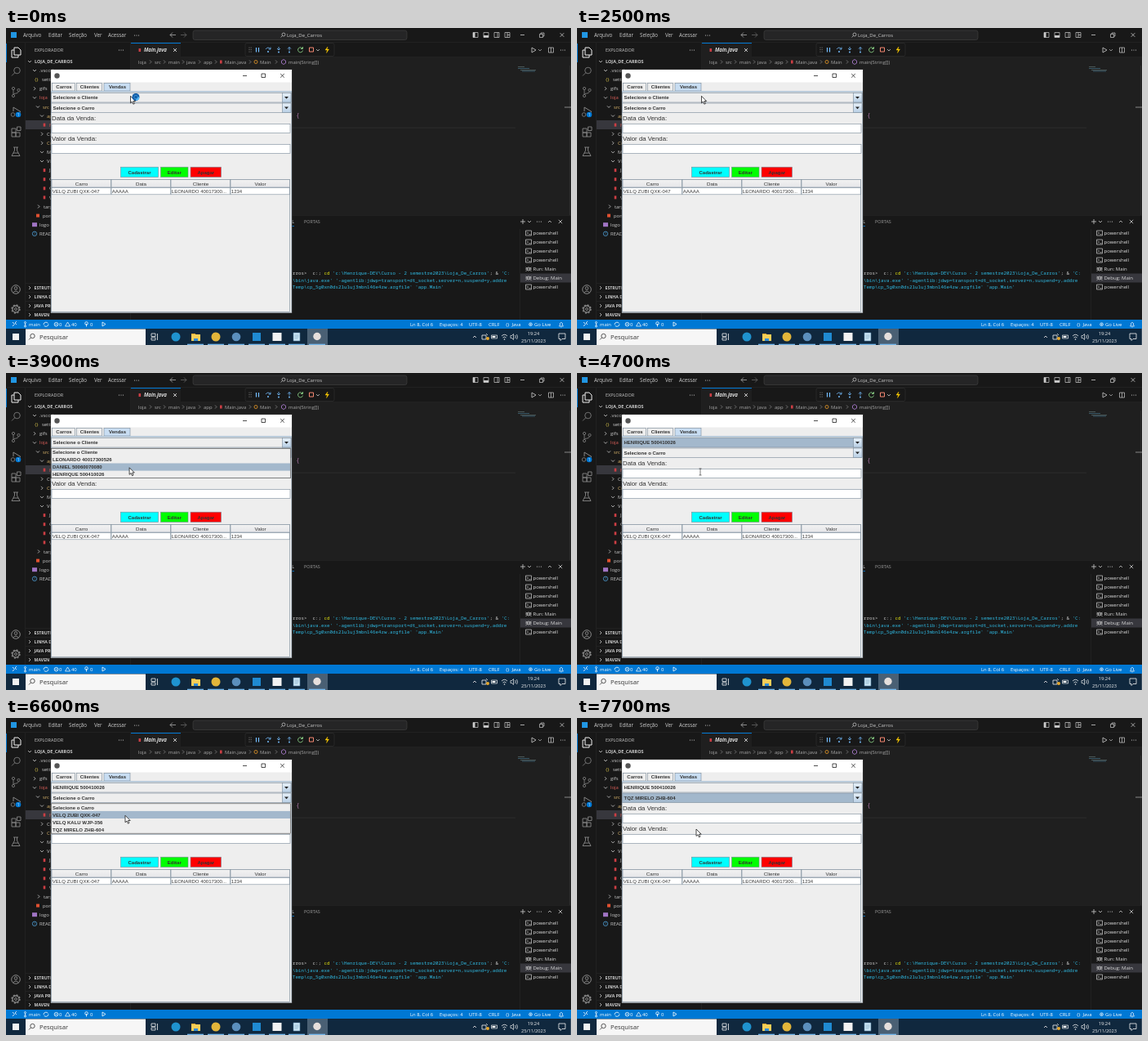
An HTML page that plays this animation: 692 by 388 pixels, repeating every 8000 ms.

```html
<!DOCTYPE html>
<html lang="pt-BR">
<head>
<meta charset="utf-8">
<title>Loja_De_Carros</title>
<style>
html, body { margin: 0; width: 100%; height: 100%; overflow: hidden; background: #181818; }
svg { display: block; width: 692px; height: 388px; font-family: "Open Sans", "Noto Sans", sans-serif; }
text { white-space: pre; }
.swing { font-family: "Liberation Sans", Arial, sans-serif; }
.mono { font-family: "Noto Sans Mono", "Liberation Mono", monospace; }
</style>
</head>
<body>
<svg id="stage" viewBox="0 0 692 388"></svg>
<script>
const rect = (x, y, w, h, fill, more = '') =>
  `<rect x="${x}" y="${y}" width="${w}" height="${h}" fill="${fill}" ${more}/>`;
const box = (x, y, w, h, fill, stroke = '#7a8a99') =>
  rect(x + .5, y + .5, w - 1, h - 1, fill, `stroke="${stroke}" stroke-width=".6"`);
const dot = (x, y, r, fill, more = '') =>
  `<circle cx="${x}" cy="${y}" r="${r}" fill="${fill}" ${more}/>`;
const ring = (x, y, r, color, w = .8) => dot(x, y, r, 'none', `stroke="${color}" stroke-width="${w}"`);
const path = (d, color = '#ccc', w = .8, fill = 'none') =>
  `<path d="${d}" stroke="${color}" stroke-width="${w}" fill="${fill}"/>`;
// y is the middle of the line
const text = (x, y, s, size = 5.9, fill = '#ccc', more = '') =>
  `<text x="${x}" y="${y + size * .36}" font-size="${size}" fill="${fill}" ${more}>${s.replace(/&/g, '&amp;').replace(/</g, '&lt;')}</text>`;
const bold = (x, y, s, fill = '#333', more = '') => text(x, y, s, 6, fill, 'font-weight="700" ' + more);
const centered = 'text-anchor="middle"';
const cross = (x, y, r, color = '#ccc', w = .8) =>
  path(`M${x - r} ${y - r}l${2 * r} ${2 * r}M${x + r} ${y - r}l${-2 * r} ${2 * r}`, color, w);
const dots = (x, y) => [-2.5, 0, 2.5].map(d => dot(x + d, y, .6, '#ccc')).join('');
const down = (x, y, c = '#ccc') => path(`M${x - 2} ${y - 1}l2 2l2-2`, c, .8);
const up = (x, y, c = '#ccc') => path(`M${x - 2} ${y + 1}l2-2l2 2`, c, .8);
const right = (x, y, c = '#ccc') => path(`M${x - 1} ${y - 2}l2 2l-2 2`, c, .8);
const lens = (x, y, r, c) => ring(x, y, r, c) + path(`M${x - r * .7} ${y + r * .7}l${-r} ${r}`, c, .8);

function titleBar() {
  let s = rect(0, 0, 692, 18, '#181818') + rect(0, 17.5, 692, .5, '#2b2b2b') + rect(6, 5, 7, 7, '#2196e3');
  [[21, 'Arquivo'], [52, 'Editar'], [77, 'Seleção'], [108, 'Ver'], [125, 'Acessar']]
    .forEach(([x, label]) => s += text(x, 8.5, label, 6.2));
  s += dots(160, 9) + path('M208 8.5h-7m3-3l-3 3l3 3', '#aaa') + path('M214 8.5h7m-3-3l3 3l-3 3', '#666');
  s += rect(229, 3, 262, 11.5, '#252526', 'rx="2.5" stroke="#454545" stroke-width=".6"');
  s += lens(340, 8, 2, '#bbb') + text(344, 8.7, 'Loja_De_Carros', 6);
  [575, 588, 601, 614].forEach((x, i) => {
    s += path(`M${x - 3} 5.5h6v6h-6z`, '#ccc', .7);
    s += [rect(x - 3, 5.5, 2.5, 6, '#ccc'), rect(x - 3, 9, 6, 2.5, '#ccc'),
      path(`M${x + 1} 5.5v6`, '#ccc', .7), path(`M${x} 5.5v6M${x} 8.5h3`, '#ccc', .7)][i];
  });
  return s + path('M630 8.5h5') + path('M653.500 7.500h4v4h-4zM655 7.500v-1.500h4v4h-1.500', '#ccc', .7) + cross(681, 8.5, 2.3);
}

function activityBar() {
  const c = '#868686';
  let s = rect(0, 18, 24, 340, '#181818') + rect(23.5, 18, .5, 340, '#2b2b2b') + rect(0, 19, 1, 23, '#0078d4');
  s += path('M10 24h5l3 3v6h-8zM10 27h-3v9h8v-3', '#eee', 1);
  s += lens(13.500, 52, 3.800, c);
  s += ring(9, 74, 1.6, c) + ring(15.5, 76, 1.6, c) + ring(9, 83, 1.6, c) + path('M9 75.600v5.800M15.500 77.600q0 2.500-6 3', c);
  s += path('M9 97l9 5.500l-5 3M9 97v5', c, 1) + ring(8.5, 106, 2.3, c) + dot(15, 106, 3.3, '#0078d4') +
    text(15, 106, '1', 4.5, '#fff', centered);
  s += path('M7 123h5v5h-5zM7 128h5v5h-5zM12 128h5v5h-5zM13.500 121h4.500v4.500h-4.500z', c, .9);
  s += path('M9 146h6M10.500 146v4l-3.500 6.500h10l-3.500-6.500v-4M9 153h6', c, .9);
  s += ring(12, 320, 5.3, c, 1) + ring(12, 318.5, 1.8, c, 1) + path('M8.500 324q3.500-4 7 0', c, 1);
  return s + ring(12, 344, 4, c, 1.3) + ring(12, 344, 1.5, c, 1) +
    dot(12, 344, 5, 'none', `stroke="${c}" stroke-width="1.400" stroke-dasharray="2 1.927"`);
}

function explorer() {
  const red = '#e0605a', gold = '#d9b36a', grey = '#ccc';
  let s = rect(24, 18, 129, 340, '#181818') + rect(152.5, 18, .5, 340, '#2b2b2b');
  s += text(35, 27, 'EXPLORADOR', 5.5) + dots(141, 27) + down(29, 41) +
    text(35, 41, 'LOJA_DE_CARROS', 5.5, grey, 'font-weight="700"') + rect(24, 113, 129, 11, '#37373d');
  // kind: v open folder, > closed folder, j class file, others are small glyphs
  const rows = [['v', 35, '.vscode'], ['{', 38, 'settings'], ['>', 35, 'gifs'], ['v', 35, 'loja', red],
    ['v', 39, 'src', gold], ['v', 44, 'app', gold], ['j', 47, 'Main', red], ['>', 44, 'Connection'],
    ['>', 44, 'Controller', gold], ['v', 44, 'Model'], ['v', 44, 'View'], ['j', 47, 'Ja'], ['j', 47, 'Ca'],
    ['j', 47, 'Cl'], ['j', 47, 'Ve'], ['>', 40, 'target'], ['p', 39, 'pom'], ['i', 35, 'logo'], ['r', 35, 'README']];
  rows.forEach(([kind, x, label, color = grey], i) => {
    const y = 52 + i * 11.1;
    s += kind == 'v' ? down(x, y) : kind == '>' ? right(x, y) : kind == '{' ? text(x - 3, y, '{}', 6, '#d6c04a') :
      kind == 'j' ? rect(x - 1.3, y - 2, 2.6, 4, '#cc3e44') : kind == 'p' ? rect(x - 2, y - 2, 4, 4, '#e05030') :
      kind == 'i' ? rect(x - 3, y - 2.5, 6, 5, '#a074c4') : ring(x, y, 2.7, '#4d9fd6') + text(x, y, 'i', 4.5, '#4d9fd6', centered);
    s += text(x + 6, y, label, 5.9, color);
  });
  ['ESTRUTURA', 'LINHA DO TEMPO', 'JAVA PROJECTS', 'MAVEN'].forEach((label, i) => {
    const y = 318 + i * 11;
    s += rect(24, y - 5.5, 129, .5, '#2b2b2b') + right(29, y) + text(34.5, y, label, 5.2, grey, 'font-weight="700"');
  });
  return s;
}

function editor() {
  let s = rect(153, 18, 539, 212, '#1f1f1f') + rect(153, 18, 539, 18, '#181818') +
    rect(153, 18, 61, 18, '#1f1f1f') + rect(153, 18, 61, 1, '#0078d4') + rect(214, 35.5, 478, .5, '#2b2b2b');
  s += rect(162.5, 25, 2.6, 4, '#cc3e44') + text(169, 27, 'Main.java', 6.2, '#fff', 'font-style="italic" font-weight="600"') + cross(207, 27, 2, '#eee');
  [[162, 'loja'], [182, 'src'], [199, 'main'], [221, 'java'], [242, 'app'], [268, 'Main.java'], [311, 'Main'], [346, 'main(String[])']]
    .forEach(([x, label]) => s += text(x, 41.5, label, 5.9, '#a9a9a9'));
  [177, 194, 217, 237, 257, 299, 331].forEach(x => s += right(x, 41.5, '#888'));
  s += rect(262, 39.5, 2.6, 4, '#cc3e44') + ring(306, 41.5, 2, '#ee9d28') + path('M340 38.500l2.500 1.500v3l-2.500 1.500l-2.500-1.500v-3z', '#b180d7');
  // debug toolbar
  s += rect(293, 18.5, 109, 16, '#181818', 'rx="2" stroke="#333" stroke-width=".6"');
  for (let i = 0; i < 6; i++) s += dot(298 + i % 2 * 2.2, 24 + (i >> 1) * 2.5, .6, '#888');
  const blue = '#75beff';
  s += path('M306.500 24v5.500M309.500 24v5.500', blue, 1.2);
  s += path('M318 26q3-4 6 0m0-2.500v2.500h-2.500', blue, .8) + dot(321, 29, 1, blue);
  s += path('M334 23v4m-2-2l2 2l2-2', blue, .8) + dot(334, 29.5, 1, blue);
  s += path('M347 27.500v-4m-2 2l2-2l2 2', blue, .8) + dot(347, 29.5, 1, blue);
  s += path('M363 25a3 3 0 1 0 .5 2.500M363.500 23v2.500h-2.500', '#89d185', .9);
  s += path('M371.500 24h5v5h-5z', '#f48771', 1) + down(382, 27) + path('M394 23l-3 4h2.500l-1 3.500l3-4.500h-2.500z', '#fc0', .4, '#fc0');
  s += path('M644 24l5 3l-5 3z') + down(654, 27, '#aaa') + path('M664.500 24h6v6h-6zM667.500 24v6', '#ccc', .7) + dots(682, 27);
  // code that is not hidden by the window
  s += rect(200, 121.7, 424, .8, '#303030') + text(355.5, 107, '{', 6.5, '#c586c0', 'class="mono"');
  [[627, 47, 8], [627, 49, 14], [630, 51, 19], [632, 52.500, 16]].forEach(([x, y, w], i) =>
    s += rect(x, y, w, .8, i % 2 ? '#41677a' : '#566'));
  return s + rect(690.5, 46, .5, 184, '#3a3a3a') + rect(684, 96.5, 8, 1, '#888');
}

function panel() {
  let s = rect(153, 229, 539, 129, '#181818') + rect(153, 229, 539, .5, '#2b2b2b');
  s += text(353, 237, 'TERMINAL', 5.4, '#eee', 'text-anchor="end"') + rect(327, 242, 26, .8, '#0078d4') + text(365, 237, 'PORTAS', 5.4, '#9d9d9d');
  s += path('M630 237h6M633 234v6') + down(641, 237) + dots(653, 237) + up(666, 237) + cross(679, 237, 2.2);
  s += rect(629, 246, .5, 112, '#2b2b2b') + rect(630, 300.5, 62, 11, '#37373d');
  ['powershell', 'powershell', 'powershell', 'powershell', 'Run: Main', 'Debug: Main', 'powershell'].forEach((label, i) => {
    const y = 251 + i * 11;
    s += label[0] == 'p' ? path(`M636.500 ${y - 3}h7v6h-7zM638 ${y - 1.500}l1.500 1.500l-1.500 1.500M640.500 ${y + 1.700}h2`, '#ccc', .7)
      : ring(640, y, 2, '#ccc') + path(`M636.500 ${y - 2}l2 1m3 0l2-1M636 ${y}h8M636.500 ${y + 2.500}l2-1m3 0l2 1`, '#ccc', .7);
    s += text(645.5, y, label, 6, '#ddd');
  });
  const line = (x, y, t, c = '#2fb9e2') => text(x, y, t, 5.83, c, 'class="mono"');
  return s + line(351, 300, 'rros>  c:;', '#ccc') + line(389.5, 300, 'cd', '#e5e510') +
    line(400, 300, "'c:\\Henrique-DEV\\Curso - 2 semestre2023\\Loja_De_Carros'") + line(592.5, 300, '; &', '#ccc') + line(606.5, 300, "'C:") +
    line(351, 308.7, "\\bin\\java.exe' '-agentlib:jdwp=transport=dt_socket,server=n,suspend=y,addre") +
    line(351, 317, "Temp\\cp_5g0xn0ds2lu1uj3mbnl46e4zw.argfile' 'app.Main'");
}

function statusBar() {
  const w = '#fff';
  let s = rect(0, 357, 692, 11, '#0078d4');
  [[28, 'main'], [65, '0'], [80, '40'], [103, '0'], [495, 'Ln 8, Col 6'], [531, 'Espaços: 4'], [567, 'UTF-8'],
    [591, 'CRLF'], [612, '{}  Java'], [647, 'Go Live']].forEach(([x, label]) => s += text(x, 362.7, label, 5.9, w));
  s += path('M8 360l2.500 2.500l-2.500 2.500M13 359l-2 2l2 2', w) + ring(23.5, 360.5, 1, w) + ring(23.5, 365, 1, w) + path('M23.500 361.500v2.500', w);
  s += path('M46 363a3 3 0 0 1 5.500-1.500M52 362.500a3 3 0 0 1-5.500 1.500', w) + ring(61.5, 362.7, 2.3, w) + cross(61.5, 362.7, .9, w, .6);
  s += path('M75.500 360l3 5h-6z', w, .7) + ring(98.5, 361.5, 1.8, w) + path('M98.500 362v3.500', w);
  s += path('M118 360l4 2.500l-4 2.500z', w) + ring(642.5, 362.7, 1.8, w) + dot(642.5, 362.7, .7, w);
  return s + path('M677.500 365h5l-1-1.500v-2q-1.500-2.500-3 0v2zM679.500 366h1', w, .7);
}

function taskbar() {
  const c = '#f2f2f2', ink = '#333';
  let s = rect(0, 368, 692, 20, '#10283e') + rect(8, 374, 8, 8, c) + rect(24, 368.5, 147, 19.5, '#f6f6f6');
  s += ring(32.5, 377, 2.7, ink) + path('M30.500 379l-2.500 2.500', ink) + text(41, 378.3, 'Pesquisar', 7.7, ink);
  s += path('M178 374h5v3.500h-5zM178 379h5v3h-5zM185.500 374v8', c, .8) + rect(369, 368, 25, 20, '#4a6074');
  s += dot(208, 378, 5.5, '#1f93cf') + rect(227, 374, 5, 3, '#e2a52b') + rect(227, 375, 11, 8, '#f7ce58') + rect(230, 380, 5, 3, '#2f8cd8');
  s += dot(257, 378, 5.5, '#e2b53a') + dot(282, 378, 5.3, '#5b8fbd') + rect(302, 373, 10, 10, '#1f8ad2') + rect(326.5, 373, 11, 10, c);
  s += path('M352 373h8v10h-8z', '#5b87a8', .6, '#cfe8f6') + path('M353.500 376h5M353.500 378h5M353.500 380h4', '#6b99b5', .6) + dot(381, 377.5, 4.7, '#e6dfdc');
  [232, 257, 282, 307, 332, 356, 381].forEach(x => s += rect(x - 10, 386.7, 20, 1.3, '#76b9ed'));
  s += up(574, 378, c) + path('M583 376h5v5h-5zM588 374l2 2', c) + dot(590, 380, 2, '#e4a72d');
  s += path('M594.500 376h7v4h-7z', c, .7) + rect(595.5, 377, 4, 2, c);
  s += path('M607 377q3.500-3.500 7 0M608.500 379q2-2 4 0', c) + dot(610.5, 381, .8, c);
  s += path('M618 376.500h1.500l2-2v7l-2-2h-1.500zM623.500 376q1.500 2 0 4M625.500 375q2 3 0 6', c, .7);
  s += text(646, 373.5, '19:24', 5.7, c, centered) + text(646, 382.5, '25/11/2023', 5.7, c, centered);
  return s + path('M677 374h8v6.500h-4l-2 2v-2h-2z', c) + rect(691, 368, .5, 20, '#5a6b7a');
}

const [BUYER, CAR] = [['Selecione o Cliente', 'LEONARDO 40017300526', 'DANIEL 50060070080', 'HENRIQUE 500410026'],
  ['Selecione o Carro', 'VELQ ZUBI QXK-047', 'VELQ KALU WJP-356', 'TQZ MIRELO ZHB-604']];

function swingWindow() {
  let s = rect(54.5, 50.5, 296, 298.5, '#444') + rect(55, 51, 295, 297.5, '#eee') + rect(55, 51, 295, 15.5, '#fff') + dot(62.5, 58.5, 3.2, '#555');
  s += path('M290 58.500h5', '#222') + path('M313 56h4.500v4.500h-4.500z', '#222') + cross(338.5, 58.3, 2.3, '#222');
  [[57, 28, 'Carros'], [87, 31, 'Clientes'], [120.5, 32, 'Vendas']].forEach(([x, w, label], i) => {
    s += box(x - 1, 67, w + 1, 10.5, i == 2 ? '#c8ddf2' : '#eee') + bold(x + w / 2, 72, label, '#333', centered);
  });
  s += rect(55, 77, 295, 1.3, '#b8cfe5') + box(55, 77.5, 295, 271, 'none', '#9aaaba');
  s += text(56, 110.3, 'Data da Venda:', 7.85, '#333') + text(56, 135.3, 'Valor da Venda:', 7.85, '#333') +
    box(55.5, 117, 293, 12, '#fff') + box(55.5, 142, 293, 12, '#fff');
  [[140, 47, '#00ffff', 'Cadastrar'], [189, 34.5, '#00ff00', 'Editar'], [225.5, 38.5, '#ff0000', 'Apagar']].forEach(([x, w, fill, label]) =>
    s += box(x, 169.7, w, 13.3, fill) + bold(x + w / 2, 176.500, label, '#333', centered));
  s += box(55, 185, 293, 163, '#eee') + rect(56, 195, 291, 9, '#fff');
  const cells = [CAR[1], 'AAAAA', BUYER[1].slice(0, 17) + '...', '1234'];
  ['Carro', 'Data', 'Cliente', 'Valor'].forEach((label, i) => {
    const x = 55.5 + i * 73;
    s += box(x, 185, 73.5, 10.5, 'url(#head)') + box(x, 195, 73.5, 9.3, 'none') +
      text(x + 37, 190.7, label, 6.2, '#333', centered) + text(x + 1.3, 199.8, cells[i], 6, '#333');
  });
  return s;
}

const combo = (y, label, focus) => box(55, y, 294.5, 12.5, focus ? '#a3b8cc' : '#eee') +
  box(338, y, 11.5, 12.5, 'url(#button)') + path(`M341 ${y + 5}h5l-2.500 2.800z`, 'none', 0, '#222') + bold(57.5, y + 6.3, label);

function popup(top, items, y) {
  const pitch = 9.1, pick = Math.max(0, Math.min(3, Math.floor((y - top) / pitch)));
  return box(55, top - .5, 294, 4 * pitch + 1, '#eee', '#444') + rect(56, top + pick * pitch, 292, pitch, '#a3b8cc') +
    items.map((label, i) => bold(57, top + (i + .5) * pitch + .1, label)).join('');
}

const keys = [[0, 152.5, 83.3], [3300, 152.5, 83.3], [3500, 151.5, 95], [4000, 151, 121], [4700, 151, 121],
  [5400, 146, 97], [6200, 146, 97], [6900, 146, 136], [8000, 146, 136]];

function pointerAt(t) {
  const i = keys.findIndex(k => k[0] > t), a = keys[i - 1], b = keys[i], f = (t - a[0]) / (b[0] - a[0]);
  return [1, 2].map(n => a[n] + (b[n] - a[n]) * f);
}

function pointer(x, y, t, beam) {
  if (beam) return path(`M${x - 1.500} ${y - 4}h3M${x} ${y - 4}v8M${x - 1.500} ${y + 4}h3`, '#222', .6);
  let s = path(`M${x} ${y}v8.500l2-1.800l1.400 3.200l1.500-.7l-1.400-3h2.700z`, '#000', .7, '#fff');
  if (t < 900) s += dot(159, 84.5, 4.5, '#0f5ca8') + ring(159, 84.5, 2.2, '#3c8fd0', 1) +
    dot(159, 84.5, 3.4, 'none', `stroke="#5cc4ff" stroke-width="1.600" stroke-dasharray="5 16.400" transform="rotate(${t * .36} 159 84.500)"`);
  return s;
}

function scene(t) {
  const [x, y] = pointerAt(t), buyerOpen = t >= 2900 && t < 4600, carOpen = t >= 5800 && t < 7600;
  let s = combo(79, BUYER[t < 4600 ? 0 : 3], t >= 4600 && t < 5800) + combo(91.5, CAR[t < 7600 ? 0 : 3], t >= 7600);
  if (buyerOpen) s += popup(92.3, BUYER, y);
  if (carOpen) s += popup(104.8, CAR, y);
  return s + pointer(x, y, t, !buyerOpen && !carOpen && y > 117 && y < 129);
}

const gradient = (id, a, b) => `<linearGradient id="${id}" x2="0" y2="1"><stop stop-color="${a}"/><stop offset="1" stop-color="${b}"/></linearGradient>`;
const stage = document.getElementById('stage');
stage.innerHTML = `<defs>${gradient('head', '#f2f2f2', '#e6e6e9')}${gradient('button', '#e8f1f9', '#b8cfe5')}</defs>` +
  titleBar() + activityBar() + explorer() + editor() + panel() + statusBar() + taskbar() +
  `<g class="swing">${swingWindow()}<g id="live"></g></g>`;

const live = document.getElementById('live');
let shown = -1;
function tick(now) {
  const t = Math.floor(now % 8000 / 100) * 100;
  if (t !== shown) live.innerHTML = scene(shown = t);
  requestAnimationFrame(tick);
}
tick(performance.now());
</script>
</body>
</html>
```
